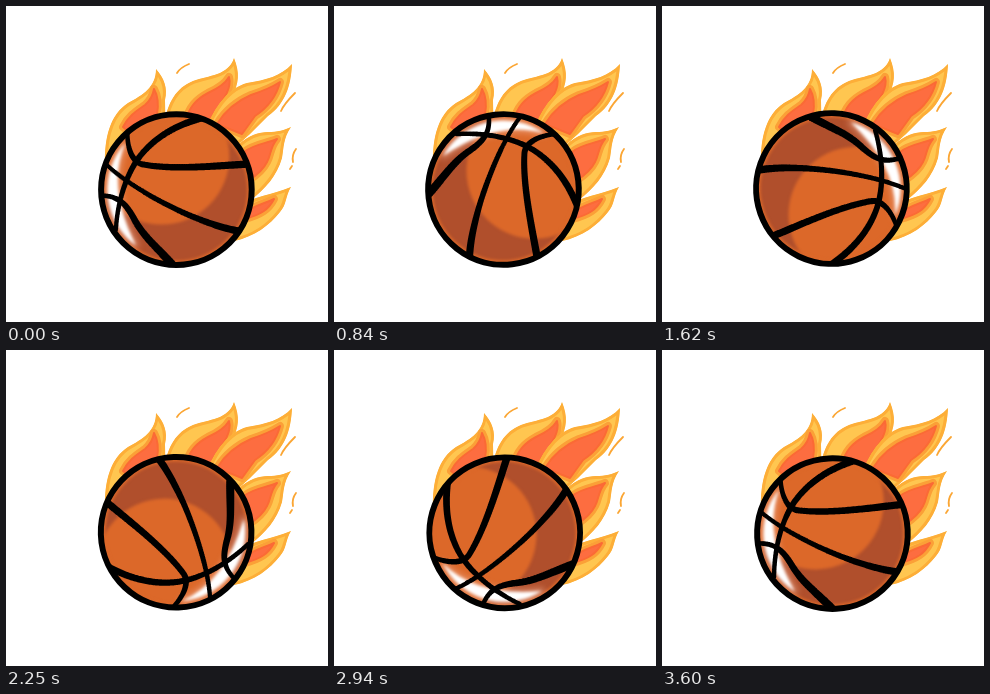
An HTML page with a canvas that plays this animation: 322 by 316 pixels, repeating every 3.63 s.

```html
<!DOCTYPE html>
<html lang="en">
<head>
<meta charset="utf-8">
<title>Flaming basketball</title>
<style>
html, body { margin: 0; width: 100%; height: 100%; overflow: hidden; background: #fff; }
canvas { display: block; }
</style>
</head>
<body>
<canvas id="stage" width="322" height="316"></canvas>
<script>
const ctx = document.getElementById('stage').getContext('2d');
const LOOP = 3630, STEP = 30, RADIUS = 75.3;
const CENTER = { x: 170, y: 183 };
const ORANGE = '#dc6829', BROWN = '#b04f2c';
const rad = deg => deg * Math.PI / 180;

// Each flame: outer tongue, then its glowing core.
const flames = [
  ['M99 160C98 130 105 108 122 97C137 89 150 81 150 63C158 72 162 82 159 94L160 150Z',
   'M117 121C123 109 132 104 139 99C145 94 147 89 148 83C152 90 153 97 151 108L140 140Z'],
  ['M158 118C162 96 170 82 187 75C203 69 222 70 228 52C234 67 233 77 226 91L224 128Z',
   'M179 117C183 100 191 93 202 87C213 82 219 78 223 71C226 82 218 93 208 107L200 125Z'],
  ['M202 118C211 98 223 82 241 77C260 74 275 70 286 58C285 80 279 98 262 110L244 128L225 145Z',
   'M211 118C219 105 231 95 245 89C257 85 265 82 274 76C270 92 261 102 249 110L236 128Z'],
  ['M232 139C243 129 253 126 262 126C271 126 279 124 285 121C277 133 278 141 276 152C271 170 259 183 245 194L225 180Z',
   'M238 146C248 138 259 138 271 133C264 141 265 149 261 156C257 164 251 169 243 174Z'],
  ['M232 200C249 190 265 189 285 181C279 191 281 198 274 206C264 219 248 231 228 235L220 215Z',
   'M239 207C249 199 258 198 268 193C263 203 255 209 238 213Z']
].map(pair => pair.map(d => new Path2D(d)));

const sparks = new Path2D(
  'M171 67C174 62 178 60 183 58M275 105C278 98 283 93 289 87' +
  'M290 143C287 147 286 151 287 156M286 160L284 163');

// Tapered seams at rest: start width, end width, chained cubic points.
const seams = [
  [7, 4.5, [197,111, 174,117, 151,128, 134,149, 120,167, 111,195, 109.5,223]],
  [4.5, 7.5, [121,127, 121,140, 125,156, 137,158, 165,163, 203,160, 240,157.5]],
  [4.2, 7.5, [100,158, 121,178, 158,198, 185,209.5, 201,216, 217,222, 235,225]],
  [4.5, 8, [96,189, 113,190, 119,197, 127,211, 136,229, 149,239, 165,257]]
];

function stroke(path, color, width) {
  ctx.strokeStyle = color;
  ctx.lineWidth = width;
  ctx.stroke(path);
}

function fill(path, color) {
  ctx.fillStyle = color;
  ctx.fill(path);
}

function circle(x, y, r) {
  const path = new Path2D();
  path.arc(x, y, r, 0, Math.PI * 2);
  return path;
}

function soft(blur, draw) {
  ctx.save();
  ctx.filter = `blur(${blur}px)`;
  draw();
  ctx.restore();
}

const bezier = (a, b, c, d, t) => {
  const s = 1 - t;
  return s * s * s * a + 3 * s * s * t * b + 3 * s * t * t * c + t * t * t * d;
};

function taperedPath([from, to, p]) {
  const path = new Path2D();
  const segments = (p.length - 2) / 6, steps = 60;
  for (let i = 0; i <= segments * steps; i++) {
    const segment = Math.min(Math.floor(i / steps), segments - 1);
    const t = i / steps - segment, k = segment * 6;
    const x = bezier(p[k], p[k + 2], p[k + 4], p[k + 6], t);
    const y = bezier(p[k + 1], p[k + 3], p[k + 5], p[k + 7], t);
    const r = (from + (to - from) * i / (segments * steps)) / 2;
    path.moveTo(x + r, y);
    path.arc(x, y, r, 0, Math.PI * 2);
  }
  return path;
}

function crescent() {
  const path = new Path2D();
  const [from, to] = [rad(126), rad(222)];
  path.arc(CENTER.x, CENTER.y, 69, from, to);
  path.quadraticCurveTo(100, 180, CENTER.x + 69 * Math.cos(from), CENTER.y + 69 * Math.sin(from));
  return path;
}

const ball = circle(CENTER.x, CENTER.y, RADIUS);
const lit = circle(155, 150, 68);
const shine = crescent();
const seamPaths = seams.map(taperedPath);

function drawFlames() {
  for (const [outer, core] of flames) {
    ctx.save();
    ctx.clip(outer);
    fill(outer, '#ffc650');
    stroke(outer, '#fdae38', 6);
    stroke(core, '#fba037', 8);
    fill(core, '#fd6d40');
    stroke(core, '#fb6a35', 2);
    ctx.restore();
  }
  stroke(sparks, '#fba634', 1.8);
}

function drawBall() {
  ctx.save();
  ctx.clip(ball);
  fill(ball, BROWN);
  soft(1.5, () => fill(lit, ORANGE));
  soft(1.5, () => stroke(ball, ORANGE, 9));
  soft(3, () => stroke(shine, 'rgba(240,170,140,.6)', 6));
  soft(1.6, () => fill(shine, '#fff'));
  for (const seam of seamPaths) fill(seam, '#000');
  ctx.restore();
  stroke(ball, '#000', 6);
}

function render(now) {
  const time = Math.floor(now % LOOP / STEP) * STEP;
  ctx.fillStyle = '#fff';
  ctx.fillRect(0, 0, 322, 316);
  ctx.lineCap = ctx.lineJoin = 'round';
  drawFlames();
  ctx.save();
  ctx.translate(CENTER.x, CENTER.y);
  ctx.rotate(Math.PI * 2 * time / LOOP);
  // The ball sits slightly off its axis.
  ctx.translate(0.4 - CENTER.x, 0.6 - CENTER.y);
  drawBall();
  ctx.restore();
}

const start = performance.now();
function tick() {
  render(performance.now() - start);
  requestAnimationFrame(tick);
}
tick();
</script>
</body>
</html>
```
